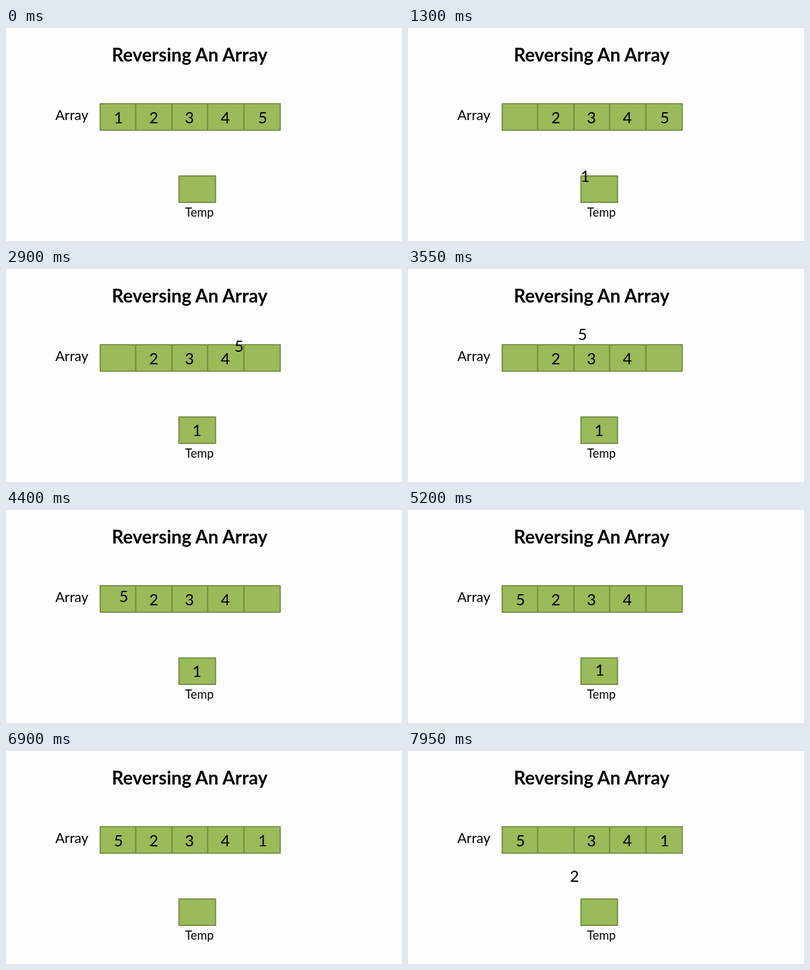
Animation, 600 px wide and 324 px high, one loop 8000 ms. Source, as an HTML page:

```html
<!DOCTYPE html>
<html lang="en">
<head>
<meta charset="utf-8">
<title>Reversing An Array</title>
<style>
  html, body { margin: 0; width: 100%; height: 100%; overflow: hidden; background: #fefdfe; }
  svg { display: block; width: 600px; height: 324px; font-family: Lato, Carlito, sans-serif; text-anchor: middle; }
  .cells { fill: #9bba59; stroke: #6d863c; stroke-width: 1.7; }
  .digits { font-size: 23.8px; }
</style>
</head>
<body>
<svg viewBox="0 0 600 324">
  <text x="278.2" y="51" font-size="27.9" font-weight="700">Reversing An Array</text>
  <text x="99.7" y="140.3" font-size="20.9">Array</text>
  <text x="293" y="286.8" font-size="18.3">Temp</text>
  <g class="cells">
    <rect x="142.7" y="115.2" width="272.8" height="40.3"/>
    <path d="M196.5 115.2V155.5M251.5 115.2V155.5M305.5 115.2V155.5M360.5 115.2V155.5"/>
    <rect x="262.1" y="225.1" width="55.4" height="40.2"/>
  </g>
  <g class="digits"></g>
</svg>
<script>
const LOOP = 8000;
const ROW = 144.7, TEMP = { x: 289.4, y: 253.7 };
const slots = [170.4, 223.8, 277.8, 332.5, 388.8].map(x => ({ x, y: ROW }));

// Each move lifts the digit by `arc` pixels halfway along its way.
const moves = [
  { digit: 1, start: 77, length: 1741, from: slots[0], to: TEMP, arc: 0 },
  { digit: 5, start: 2162, length: 2590, from: slots[4], to: slots[0], arc: 38 },
  { digit: 1, start: 5065, length: 1741, from: TEMP, to: slots[4], arc: 0 },
  { digit: 2, start: 7075, length: 1760, from: slots[1], to: { x: 281, y: TEMP.y }, arc: 0 }
];

const group = document.querySelector('.digits');
const digits = slots.map((slot, i) => {
  const text = document.createElementNS('http://www.w3.org/2000/svg', 'text');
  text.textContent = i + 1;
  return group.appendChild(text);
});

// Constant acceleration to the middle, then constant braking.
const ease = u => u < 0.5 ? 2 * u * u : 1 - 2 * (1 - u) ** 2;

function place(digit, { x, y }) {
  digits[digit - 1].setAttribute('x', x);
  digits[digit - 1].setAttribute('y', y);
}

function draw(time) {
  slots.forEach((slot, i) => place(i + 1, slot));
  for (const { digit, start, length, from, to, arc } of moves) {
    if (time < start) break;
    const u = ease(Math.min(1, (time - start) / length));
    place(digit, {
      x: from.x + (to.x - from.x) * u,
      y: from.y + (to.y - from.y) * u - arc * Math.sin(Math.PI * u)
    });
  }
}

const begin = performance.now();
function tick() {
  draw((performance.now() - begin) % LOOP);
  requestAnimationFrame(tick);
}
tick();
</script>
</body>
</html>
```
